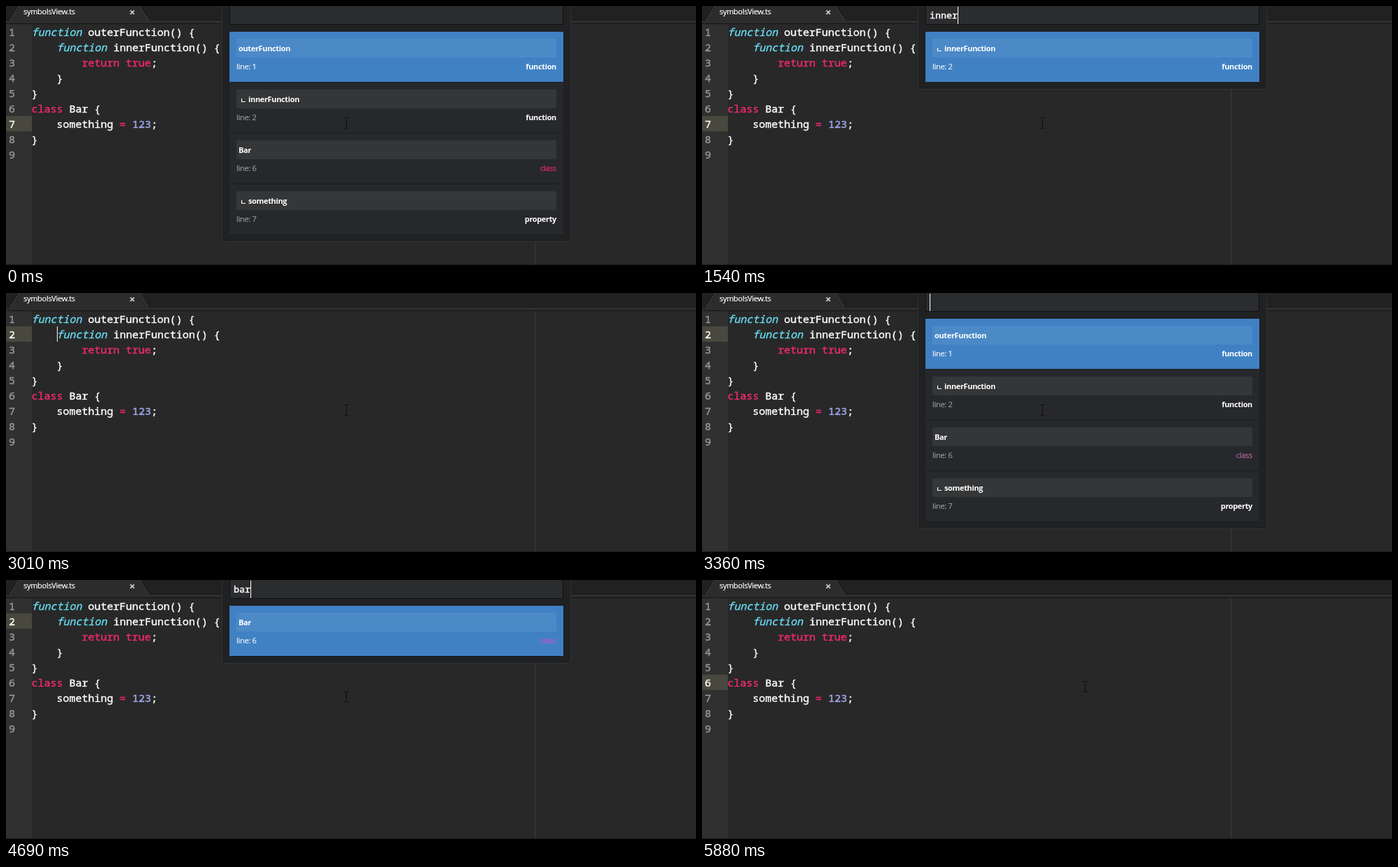
Write an HTML page that moves like this. It is 988x372 px and loops after 6.02 s.

```html
<!DOCTYPE html>
<html lang="en">
<head>
<meta charset="utf-8">
<title>Symbol search in an editor</title>
<style>
  html, body { margin: 0; width: 100%; height: 100%; overflow: hidden; background: #282828; }
  svg { display: block; width: 988px; height: 372px; }
  text { white-space: pre; color: #fff; fill: currentColor; stroke: currentColor; stroke-width: .4px; }
  .code { font: 15px "Noto Sans Mono", "DejaVu Sans Mono", monospace; }
  .num { color: #9a9a9a; }
  .kw { color: #f0296f; }
  .fn { color: #66d9ef; font-style: italic; }
  .lit { color: #a3aaeb; }
  .ui { font: 11px "Open Sans", "Noto Sans", sans-serif; letter-spacing: -.3px; stroke-width: .2px; }
  .bold { font-weight: 700; letter-spacing: -.35px; stroke-width: 0; }
  .query { font: 13.33px "Noto Sans Mono", "DejaVu Sans Mono", monospace; }
</style>
</head>
<body>
<svg viewBox="0 0 988 372">
  <rect width="988" height="372" fill="#282828"/>
  <g id="tabs">
    <rect width="988" height="21" fill="#212121"/>
    <rect y="20" width="988" height="1" fill="#151515"/>
    <rect y="21" width="988" height="1" fill="#383838"/>
    <rect y="22" width="988" height="3" fill="#2b2b2b"/>
    <rect y="25" width="988" height="1" fill="#161616"/>
    <path d="M3.5 21.5 L17.5 -1 H192.5 L206.5 21.5" fill="#2c2c2c" stroke="#131313"/>
    <path d="M4.7 22 L18.7 -1 H191.3 L205.3 22" fill="#2c2c2c" stroke="#404040" stroke-width=".9"/>
    <rect x="5" y="22" width="201" height="2" fill="#2c2c2c"/>
    <text class="ui" x="25" y="12">symbolsView.ts</text>
    <path d="M178 6.3 L183.6 11.9 M183.6 6.3 L178 11.9" stroke="#c4c4c4" stroke-width="1.9"/>
  </g>
  <rect y="26" width="37" height="346" fill="#303030"/>
  <rect x="757" y="26" width="1" height="346" fill="#3b3b3b"/>
  <rect y="371" width="988" height="1" fill="#1d1d1d"/>
  <rect id="active" width="37" height="22" fill="#49483e"/>
  <g id="code"></g>
  <rect id="caret" width="1" height="22" fill="#f8f8f0"/>
  <g id="panel"></g>
  <path id="mouse" d="M-3 -7.5 H-1 L.5 -6.5 L2 -7.5 H4 M.5 -6.5 V6.5 M-3 7.5 H-1 L.5 6.5 L2 7.5 H4" fill="none" stroke="#0d0d0d"/>
</svg>
<script>
const LOOP = 6020;
const ROW = 22, ITEM = 73;
const $ = id => document.getElementById(id);

const symbols = {
  outer: { name: "outerFunction", line: 1, kind: "function" },
  inner: { name: "innerFunction", line: 2, kind: "function", child: true },
  bar: { name: "Bar", line: 6, kind: "class" },
  some: { name: "something", line: 7, kind: "property", child: true }
};
const all = ["outer", "inner", "bar", "some"];
const fuzzy = ["inner", "some", "outer"];

const source = [
  [["fn", "function"], ["", " outerFunction() {"]],
  [["", "    "], ["fn", "function"], ["", " innerFunction() {"]],
  [["", "        "], ["kw", "return true"], ["", ";"]],
  [["", "    }"]],
  [["", "}"]],
  [["kw", "class"], ["", " Bar {"]],
  [["", "    something "], ["kw", "="], ["", " "], ["lit", "123"], ["", ";"]],
  [["", "}"]],
  []
];

// Each step: start time, active line, caret shown, query and list (panel open only)
const steps = [
  [0, 7, 0, "", all],
  [210, 7, 1, "", all],
  [560, 7, 0, "", all],
  [700, 7, 1, "i", all],
  [770, 7, 1, "i", fuzzy],
  [1190, 7, 0, "i", fuzzy],
  [1260, 7, 1, "in", fuzzy],
  [1400, 7, 1, "inn", fuzzy],
  [1470, 7, 1, "inne", ["inner"]],
  [1540, 7, 1, "inner", ["inner"]],
  [1750, 2, 1],
  [2170, 2, 0],
  [2520, 2, 1],
  [2870, 2, 0],
  [3010, 2, 1],
  [3360, 2, 1, "", all],
  [3570, 2, 0, "", all],
  [3990, 2, 1, "", all],
  [4340, 2, 0, "", all],
  [4480, 2, 1, "b", all],
  [4550, 2, 1, "ba", ["bar"]],
  [4690, 2, 1, "bar", ["bar"]],
  [5180, 6, 1],
  [5670, 6, 0]
];

// Start time and centre of the mouse pointer
const pointer = [[0, 487, 168], [5810, 520, 157], [5880, 548, 153]];

const at = (list, t) => list.findLast(entry => entry[0] <= t);
const rect = (x, y, w, h, fill) =>
  `<rect x="${x}" y="${y}" width="${w}" height="${h}" fill="${fill}"/>`;
const text = (cls, x, y, body, attrs = "") =>
  `<text class="${cls}" x="${x}" y="${y}" ${attrs}>${body}</text>`;
const baseline = line => 43 + ROW * (line - 1);

function codeMarkup(active) {
  return source.map((parts, i) => {
    const spans = parts.map(([cls, s]) => `<tspan class="${cls}">${s}</tspan>`).join("");
    const color = i + 1 === active ? 'style="color:#fff"' : "";
    return text("code num", 4, baseline(i + 1), i + 1, color) +
      text("code", 36.6, baseline(i + 1), spans);
  }).join("");
}

function kindColor(kind, selected, line) {
  if (kind !== "class") return "#fff";
  return selected ? "#c557c6" : line === 7 ? "#ee2b72" : "#b568a4";
}

function itemMarkup(key, i, activeLine) {
  const { name, line, kind, child } = symbols[key];
  const y = 37 + ITEM * i, selected = i === 0;
  const nameX = child ? 347 : 333;
  const color = `color:${kindColor(kind, selected, activeLine)}`;
  const lineColor = `style="color:${selected ? "#f2f6fa" : "#999a9c"}"`;
  return rect(320, y, 478, 72, selected ? "#4081c4" : "#27282b") +
    rect(320, y + 72, 478, 1, "#1c1d1f") +
    `<rect x="330" y="${y + 10}" width="458" height="27" rx="1.5" fill="${selected ? "#4c89c7" : "#353638"}"/>` +
    (child ? `<path d="M337.5 ${y + 23} V${y + 27.5} H343" fill="none" stroke="#fff" stroke-width="1.2"/>` : "") +
    text("ui bold", nameX, y + 28, name) +
    text("ui", 330, y + 54, `line: ${line}`, lineColor) +
    text(kind === "class" ? "ui" : "ui bold", 788, y + 54, kind, `text-anchor="end" style="${color}"`);
}

function panelMarkup(line, caret, query, list) {
  const bottom = 46.5 + ITEM * list.length;
  return `<path d="M309.5 -1 V${bottom - 3} q0 3 3 3 H805.5 q3 0 3 -3 V-1 Z" fill="#202123" stroke="#303133"/>` +
    '<path d="M320.5 -1 V26.5 H797.5 V-1" fill="#2b2c2e" stroke="#101011"/>' +
    text("query", 326, 18, query) +
    (caret ? rect(326 + 8 * query.length, 1, 1, 25, "#fff") : "") +
    list.map((key, i) => itemMarkup(key, i, line)).join("");
}

function showStep([, line, caret, query, list]) {
  $("active").setAttribute("y", 26 + ROW * (line - 1));
  $("code").innerHTML = codeMarkup(line);
  $("panel").innerHTML = list ? panelMarkup(line, caret, query, list) : "";
  const el = $("caret");
  el.setAttribute("x", line === 2 ? 73 : 37);
  el.setAttribute("y", 26 + ROW * (line - 1));
  el.setAttribute("visibility", caret && !list ? "visible" : "hidden");
}

let shown;
function draw(t) {
  const step = at(steps, t);
  if (step !== shown) showStep(shown = step);
  const [, x, y] = at(pointer, t);
  $("mouse").setAttribute("transform", `translate(${x} ${y})`);
}

const start = performance.now();
function tick() {
  draw((performance.now() - start) % LOOP);
  requestAnimationFrame(tick);
}
tick();
</script>
</body>
</html>
```
